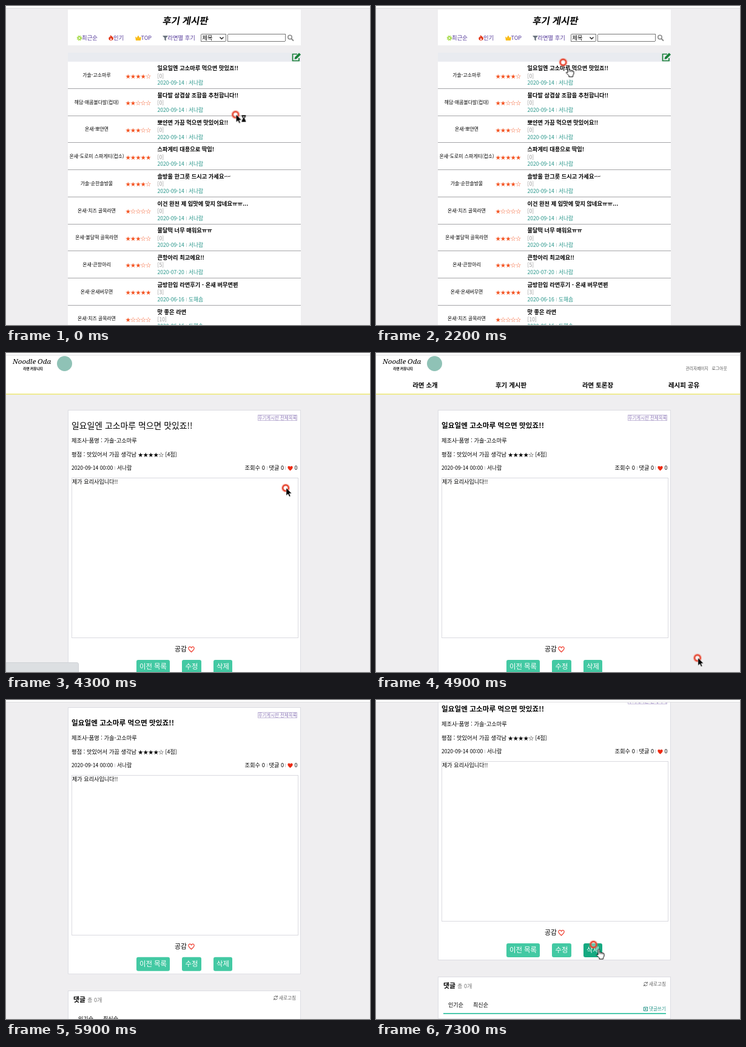
These frames come from a looping animation (600 px wide and 527 px high, 8 s). An HTML page:

```html
<!DOCTYPE html>
<html lang="ko">
<head>
<meta charset="utf-8">
<title>후기 게시판</title>
<style>
html, body { margin: 0; width: 100%; height: 100%; overflow: hidden; background: #efeef0; }
svg { display: block; width: 600px; height: 527px; }
text { font-family: "Noto Sans CJK KR", "Noto Sans CJK JP", "Noto Sans CJK", "Noto Sans", sans-serif; white-space: pre; }
rect, line { shape-rendering: crispEdges; }
.round { shape-rendering: auto; }
.b { font-weight: 700; }
.m { font-weight: 500; }
.x { font-weight: 900; }
.mid { text-anchor: middle; }
.logo { font-family: "Noto Serif", "Liberation Serif", serif; font-style: italic; }
.purple { fill: #553a9a; }
.gray { fill: #999; }
.teal { fill: #249488; }
.star { fill: #f4511e; }
.white { fill: #fff; }

.board, .detail, .status, .menu, .nav, .plain, .styled, .wait, .arrow, .hand {
  animation: 8s step-end infinite;
}
.board { animation-name: board; }
.detail { animation-name: detail; }
.status { animation-name: status; }
.menu { animation-name: menu; }
.nav, .styled { animation-name: loaded; }
.plain { animation-name: unloaded; }
.wait { animation-name: wait; }
.arrow { animation-name: arrow; }
.hand { animation-name: hand; }
.scroll { animation: scroll 8s linear infinite; }
.cursor { animation: cursor 8s linear infinite; }
.delete { animation: hover 8s linear infinite; }

@keyframes board { 0% { visibility: visible } 46.2%, 100% { visibility: hidden } }
@keyframes detail { 0% { visibility: hidden } 46.2%, 100% { visibility: visible } }
@keyframes status { 0% { opacity: 0 } 39.9% { opacity: 1 } 56.2%, 100% { opacity: 0 } }
@keyframes menu { 0% { opacity: 0 } 56.2%, 100% { opacity: 1 } }
@keyframes loaded { 0% { opacity: 0 } 57.4%, 100% { opacity: 1 } }
@keyframes unloaded { 0% { opacity: 1 } 57.4%, 100% { opacity: 0 } }
@keyframes wait { 0% { opacity: 1 } 24.9%, 100% { opacity: 0 } }
@keyframes arrow { 0% { opacity: 1 } 24.9% { opacity: 0 } 46.2% { opacity: 1 } 84.9%, 100% { opacity: 0 } }
@keyframes hand { 0% { opacity: 0 } 24.9% { opacity: 1 } 46.2% { opacity: 0 } 84.9%, 100% { opacity: 1 } }
@keyframes scroll {
  0%, 70% { transform: translateY(0) }
  71.25% { transform: translateY(-15px) }
  72.5% { transform: translateY(-50px) }
  73.75% { transform: translateY(-82px) }
  75%, 100% { transform: translateY(-105px) }
}
@keyframes cursor {
  0% { transform: translate(378.5px, 179.5px) }
  11.25%, 22.5% { transform: translate(294.5px, 110px) }
  26.25%, 46.2% { transform: translate(308.5px, 93px) }
  52.5%, 56.25% { transform: translate(461px, 223px) }
  62%, 77.5% { transform: translate(540px, 545px) }
  81.25% { transform: translate(347px, 375px) }
  86%, 100% { transform: translate(358.5px, 404px) }
}
@keyframes hover { 0%, 84.9% { fill: #43c9a3 } 87%, 100% { fill: #16a981 } }
</style>
</head>
<body>
<svg id="stage" viewBox="0 0 600 527"></svg>
<script>
const text = (x, y, size, str, cls = '', fill = '') =>
  `<text x="${x}" y="${y}" font-size="${size}" class="${cls}"${fill && ` fill="${fill}"`}>${str}</text>`;
const rect = (x, y, w, h, fill, extra = '') =>
  `<rect x="${x}" y="${y}" width="${w}" height="${h}" fill="${fill}" ${extra}/>`;
const frame = (x, y, w, h, stroke, extra = '') =>
  rect(x + .5, y + .5, w - 1, h - 1, '#fff', `stroke="${stroke}" ${extra}`);
const path = (d, fill, extra = '') => `<path d="${d}" fill="${fill}" ${extra}/>`;
const outline = (d, stroke, width = 1) => path(d, 'none', `stroke="${stroke}" stroke-width="${width}"`);
const group = (cls, ...parts) => `<g class="${cls}">${parts.join('')}</g>`;
const at = (x, y, body) => `<g transform="translate(${x} ${y})">${body}</g>`;
const stars = n => '★'.repeat(n) + '☆'.repeat(5 - n);

const HEART = 'M0 4.5C-2 2.6-4.7.7-4.7-1.7C-4.7-4.6-1.2-5 0-2.5C1.2-5 4.7-4.6 4.7-1.7C4.7.7 2 2.6 0 4.5Z';
const WRITER = '서나람', OTHER = '도해솜';
const TITLE = '일요일엔 고소마루 먹으면 맛있죠!!';

// label, stars, title, comments, date, writer
const posts = [
  ['가솔-고소마루', 4, TITLE, 0],
  ['해담-매콤불다발(컵대)', 2, '불다발 삼겹살 조합을 추천합니다!!', 0],
  ['온새-뽀얀면', 3, '뽀얀면 가끔 먹으면 맛있어요!!', 0],
  ['온새-도로미 스파게티(컵소)', 5, '스파게티 대용으로 딱임!', 0],
  ['가솔-순한솔방울', 4, '솔방울 한그릇 드시고 가세요~~', 0],
  ['온새-치즈 골목라면', 1, '이건 완전 제 입맛에 맞지 않네요ㅠㅠ...', 0],
  ['온새-불달떡 골목라면', 3, '불달떡 너무 매워요ㅠㅠ', 0],
  ['온새-큰항아리', 3, '큰항아리 최고에요!!', 5, '2020-07-20'],
  ['온새-온새버무면', 5, '금방한입 라면후기 - 온새 버무면편', 3, '2020-06-16', OTHER],
  ['온새-치즈 골목라면', 1, '맛 좋은 라면', 10, '2020-06-16', OTHER],
];

const post = ([label, score, title, comments, date = '2020-09-14', writer = WRITER], i) =>
  at(0, i * 44.7,
    text(149.5, 117, 7.9, label, 'mid m') +
    text(197, 118.5, 8.4, stars(score), 'star') +
    text(249.5, 106.3, 9.25, title, 'b') +
    text(249.5, 118.6, 8.6, `[${comments}]`, 'gray') +
    text(249.5, 130.2, 8.65, date, 'teal') +
    rect(296.5, 124, 1, 6, '#c4d4d3') +
    text(301, 130.2, 8.75, writer, 'teal')) +
  rect(102, Math.round(136 + i * 44.7), 384, 1, '#a5a5a8');

const boardIcons =
  `<circle cx="121" cy="53" r="3" fill="none" stroke="#a4dc3c" stroke-width="2.6" stroke-dasharray="1.4 .95"/>` +
  `<circle cx="121" cy="53" r="2" fill="none" stroke="#8fd02a"/>` +
  path('M172 48C174 50 177.200 51 177 54C176.500 57.500 170 58 169.300 54.500C169 52.500 170 51.500 170.500 50.500L171.500 52Z', '#e23b1f') +
  path('M173 53C175 55 174.500 56.200 173 56.200S171.300 54.600 173 53Z', '#fff') +
  path('M213 50.500L215.500 52.500L218 48.500L220.500 52.500L223 50.500L222 57H214Z', '#f9bd1c') +
  path('M258 49H267L263.800 53V57.500L261.300 56V53Z', '#6d7680');

const board = group('board',
  rect(102, 6, 384, 59, '#fff'),
  rect(102, 77, 384, 15, '#e9ebf0'),
  rect(102, 92, 384, 435, '#fff'),
  at(295, 30, `<g transform="skewX(-10)">${text(0, 0, 15.4, '후기 게시판', 'mid x')}</g>`),
  boardIcons,
  text(125, 56.2, 9.4, '최근순', 'purple'),
  text(177, 56.2, 9.4, '인기', 'purple'),
  text(222.500, 56.2, 9, 'TOP', 'purple'),
  text(266.500, 56.2, 9.3, '라면별 후기', 'purple'),
  frame(321, 46, 42, 13, '#777', 'rx="1.5"'),
  text(323.5, 56, 9.3, '제목', 'm'),
  outline('M352.500 51.500L355.500 54.500L358.500 51.500', '#222', 1.5),
  frame(365, 46, 96, 13, '#777', 'rx="1.5"'),
  `<circle cx="468" cy="51.500" r="3.200" fill="none" stroke="#8a8a8a" stroke-width="1.500"/>`,
  outline('M470.300 54L474 57.500', '#8a8a8a', 2),
  outline('M480 79.500H472.500V90.500H483V86', '#188038', 1.7),
  path('M475.500 88L476.300 84.500L483 77.500L486 80.300L479 87.200Z', '#188038'),
  posts.map(post).join(''));

const button = (x, w, label, cls = '') =>
  rect(x, 507, w, 23, '#43c9a3', `rx="3" class="round ${cls}"`) +
  text(x + w / 2, 522.3, 11.4, label, 'mid white');

const bar = x => rect(x, 187, 1, 6, '#c8c8cc');

const header =
  rect(0, 0, 600, 67, '#fff') + rect(0, 67, 600, 1.5, '#f0eb92') +
  text(11, 18, 11.6, 'Noodle Oda', 'logo') +
  text(44.5, 27.500, 5.6, '라면 커뮤니티', 'mid x') +
  `<circle cx="96.500" cy="17.500" r="12.500" fill="#8fc2b6"/>` +
  group('menu',
    text(510.5, 28, 6.75, '관리자페이지', 'm', '#555'),
    text(553.5, 28, 6.85, '로그아웃', 'm', '#555')) +
  group('nav', [[81, '라면 소개'], [222.5, '후기 게시판'], [365.5, '라면 토론장'], [507.5, '레시피 공유']]
    .map(([x, label]) => text(x, 57, 10.5, label, 'mid b')).join(''));

const article =
  frame(102, 94, 384, 441, '#dcdce2') +
  frame(415, 102, 65, 10, '#c3b9d8') +
  text(447.5, 109.800, 7.45, '후기게시판 전체목록', 'mid', '#8d78b8') +
  text(108, 125.300, 13.9, TITLE, 'plain') +
  text(108, 124.200, 11.7, TITLE, 'styled x') +
  text(108, 148.3, 9.25, '제조사-품명 : 가솔-고소마루') +
  text(108, 171.3, 9.3, '평점 : 맛있어서 가끔 생각남') +
  text(217.5, 171.3, 8.5, stars(4)) +
  text(262.5, 171.3, 8.9, '[4점]') +
  text(108, 193.3, 8.65, '2020-09-14 00:00') + bar(179) +
  text(183, 193.3, 8.8, WRITER) +
  text(393.5, 193.3, 9.3, '조회수 0') + bar(430) +
  text(433.5, 193.3, 9.2, '댓글 0') + bar(460) +
  at(468.5, 190.5, path(HEART, '#ee2a12', 'transform="scale(.88)"')) +
  text(475.5, 193.3, 8.8, '0') +
  frame(108, 206, 374, 265, '#dadae0') +
  text(109, 216.2, 9.1, '제가 요리사입니다!!') +
  text(278, 493.2, 10.8, '공감') +
  at(305.5, 489.5, outline(HEART, '#ee3a2c', 1.2)) +
  button(215, 55, '이전 목록') + button(290, 32, '수정') + button(342, 31, '삭제', 'delete');

const comments =
  frame(102, 562, 384, 70, '#dcdce2') +
  text(111, 581, 10.9, '댓글', 'b') +
  text(134, 581, 9.2, '총 0개', '', '#777') +
  outline('M441.700 573.500A3 3 0 0 1 447 572.500M447.300 570.500V573H445M447.300 575A3 3 0 0 1 442 576M441.700 578V575.500H444', '#666') +
  text(450, 577.3, 7.6, '새로고침', '', '#666') +
  text(119, 612, 9.1, '인기순') + text(160, 612, 9.1, '최신순') +
  frame(441, 612, 7, 7, '#249488') +
  outline('M443 615.500H446M444.500 614V617', '#249488') +
  text(450, 618.3, 7.5, '댓글쓰기', 'teal') +
  rect(111, 622, 367, 1.5, '#4cc9ad');

const detail = group('detail', group('scroll', header, article, comments));

const cursor = group('cursor',
  `<circle r="5" fill="#fff" fill-opacity=".35" stroke="#f27a68" stroke-opacity=".45" stroke-width="4.500"/>`,
  `<circle r="4.800" fill="none" stroke="#e4412c" stroke-width="2.200"/>`,
  group('arrow', path('M1 0V12.500L3.900 9.800L6 14.300L7.900 13.400L5.900 9H9.800Z', '#000', 'stroke="#fff" stroke-width=".400"')),
  group('wait', path('M10 1H17V2.500H16.200V4.500L14.300 6.500L16.200 8.500V10.500H17V12H10V10.500H10.800V8.500L12.700 6.500L10.800 4.500V2.500H10Z', '#000'),
    path('M12 3H15V4L13.500 5.300L12 4Z', '#fff')),
  group('hand', path('M7.500 17V8.500Q8.700 6.500 10 8.500V13Q11.500 12 12.500 13.500Q14 12.500 15 14Q17.500 13.500 17.500 16V19L16 22V24H9.500V22L5 17.500Q4.500 15.500 7.500 17Z', '#fff',
    'stroke="#000" stroke-linejoin="round"'),
    outline('M10 13V16M12.500 13.500V16M15 14V16.500', '#000', .8)));

const status = group('status', path('M0 511.500H117Q119.500 511.500 119.500 514V528H0Z', '#dcdfe2', 'stroke="#cfd2d6"'));

document.getElementById('stage').innerHTML =
  rect(0, 0, 600, 527, '#efeef0') + board + detail +
  rect(0, 0, 600, 3, '#fff') + rect(0, 3, 600, 1, '#dedee0') +
  status + cursor;
</script>
</body>
</html>
```
